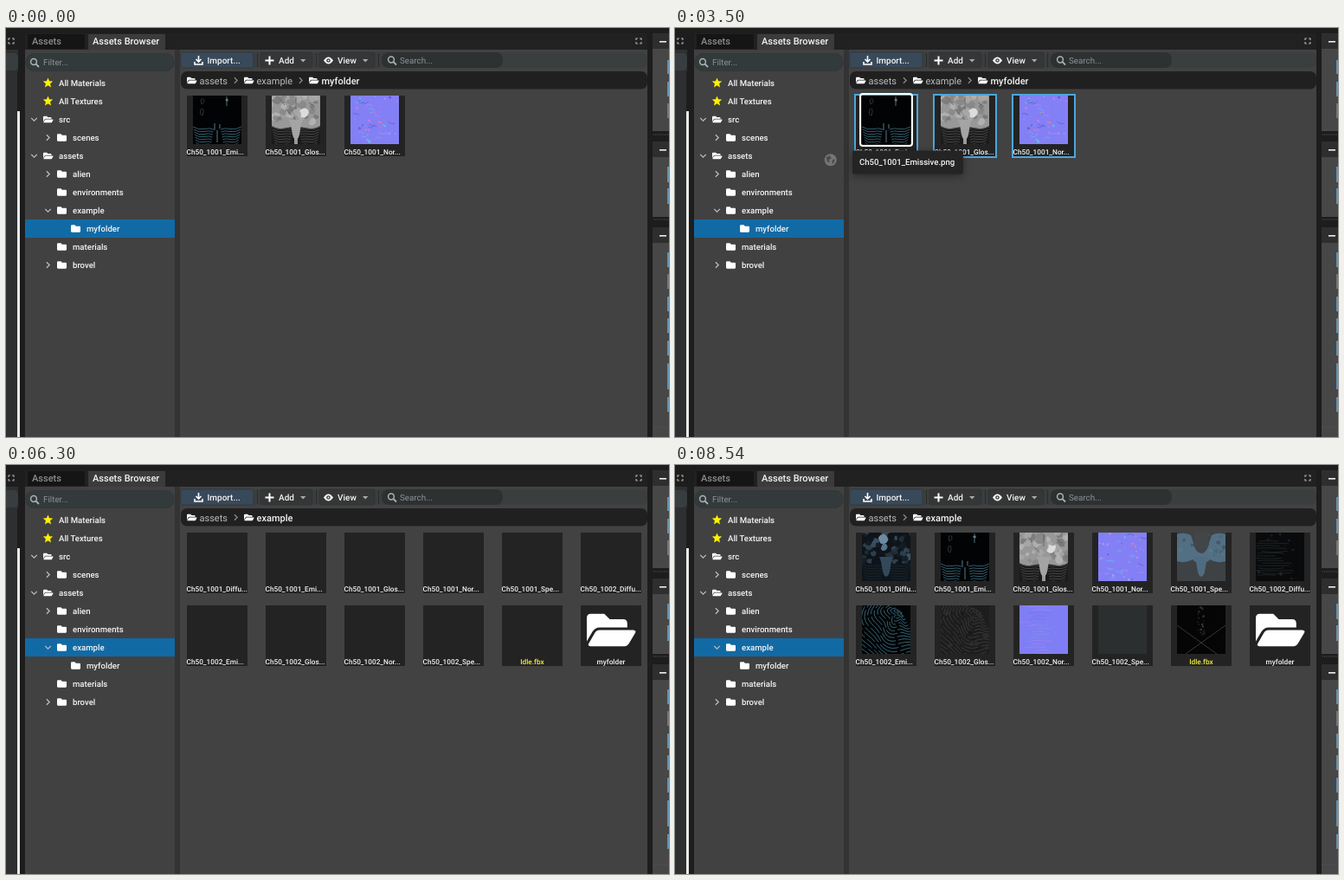
An HTML page for the animation above (9870 ms loop, 766 px wide and 472 px high).

```html
<!DOCTYPE html>
<html lang="en">
<head>
<meta charset="utf-8">
<title>Assets Browser</title>
<style>
html, body { margin: 0; width: 100%; height: 100%; overflow: hidden; background: #1d1d1d; }
#stage { display: block; width: 766px; height: 472px; }
text { font: 500 9.6px Roboto, Arial, sans-serif; fill: #f4f4f4; text-rendering: geometricPrecision; white-space: pre; }
.tab { font-size: 11px; }
.crumb { font-size: 11px; }
.path { font-size: 11px; font-weight: 400; fill: #b9bcbe; }
.btn { font-size: 10px; }
.label { font-size: 8.25px; }
.dim { fill: #8d9294; font-weight: 400; font-size: 9.8px; }
.soft { filter: blur(.4px); }
.edge { stroke: #303233; stroke-width: .6; }
.pick { fill: none; stroke: #4ba6dc; stroke-width: 2; }
.focus { fill: none; stroke: #fff; stroke-width: 2; }
.tip rect { fill: #242424; filter: drop-shadow(0 2px 4px rgba(0, 0, 0, .4)); }
</style>
</head>
<body>
<svg id="stage" viewBox="0 0 766 472"></svg>
<script>
const LOOP = 9870;
const stage = document.getElementById('stage');

let seed = 7;
function rand() {
  seed = (seed * 16807) % 2147483647;
  return seed / 2147483647;
}
const between = (a, b) => a + (b - a) * rand();
const pick = list => list[Math.floor(rand() * list.length)];
const repeat = (n, fn) => Array.from({ length: n }, (_, i) => fn(i)).join('');

// Basic pieces
const rect = (x, y, w, h, fill, r = 0) =>
  `<rect x="${x}" y="${y}" width="${w}" height="${h}" rx="${r}" fill="${fill}"/>`;
const text = (x, y, s, cls = '', extra = '') =>
  `<text x="${x}" y="${y}" class="${cls}" ${extra}>${s}</text>`;
const line = (d, stroke, width = 1) =>
  `<path d="${d}" fill="none" stroke="${stroke}" stroke-width="${width}"/>`;
const group = (cls, body) => `<g class="${cls}">${body}</g>`;
const at = (x, y, body, scale = 1) =>
  `<g transform="translate(${x} ${y}) scale(${scale})">${body}</g>`;
const timed = (on, body, fade = 0) => `<g data-on="${on}" data-fade="${fade}">${body}</g>`;

// Icons
const closedPath = '<path fill="#fff" d="M46 13H27l-6-7H5Q0 6 0 11v29q0 5 5 5h41q5 0 5-5V18q0-5-5-5z"/>';
const openPath = '<path fill="#fff" d="M57.300 29.200 50 41.600Q48.200 44.800 44.500 44.800h-40q-4-.500-2-3.600L9.700 28.800q1.800-3.200 5.500-3.200h40q4 .500 2.100 3.600zM15.200 22.400H48v-4.800q0-4.800-4.800-4.800h-16l-6.400-6.400h-16Q0 6.400 0 11.200V39L6.900 27.200q2.900-4.800 8.300-4.800z"/>';
// folders are placed by their left edge and vertical centre
const folder = (x, y, path, scale) => at(x, y - 25.6 * scale, path, scale);
const closedFolder = (x, y) => folder(x, y, closedPath, .216);
const openFolder = (x, y) => folder(x, y, openPath, .2);
const chevDown = (x, y, c = '#bbb') => at(x, y, line('M-3.3-1.6 0 1.7 3.3-1.6', c, 1.3));
const chevRight = (x, y, c = '#bbb') => at(x, y, line('M-1.6-3.3 1.7 0-1.6 3.3', c, 1.3));
const lens = (x, y) => at(x, y, '<circle cx="-1" cy="-1" r="3.4" fill="none" stroke="#aeb2b3" stroke-width="1.5"/>' + line('M1.6 1.6 5 5', '#aeb2b3', 1.8));
const expand = (x, y) => at(x, y, line('M-3-1V-3H-1M1-3H3V-1M3 1V3H1M-1 3H-3V1', '#aaa', 1.2));
function star(x, y) {
  const points = Array.from({ length: 10 }, (_, i) => {
    const r = i % 2 ? 2.7 : 6, a = Math.PI * (i / 5 - .5);
    return `${(x + r * Math.cos(a)).toFixed(1)},${(y + r * Math.sin(a)).toFixed(1)}`;
  });
  return `<polygon points="${points.join(' ')}" fill="#fff000"/>`;
}

// Texture thumbnails, 56 by 56
function blob(x, y, r, fill, opacity = 1) {
  const points = Array.from({ length: 9 }, (_, i) => {
    const a = i / 9 * Math.PI * 2, d = r * between(.55, 1.2);
    return `${(x + d * Math.cos(a)).toFixed(1)},${(y + d * Math.sin(a)).toFixed(1)}`;
  });
  return `<polygon points="${points.join(' ')}" fill="${fill}" opacity="${opacity}"/>`;
}
const mirror = body => body + `<g transform="translate(56 0) scale(-1 1)">${body}</g>`;
const ribs = (stroke, width) => mirror(repeat(7, i => {
  const y = 36 + i * 3;
  return line(`M${i * .6} ${y}Q7 ${y + 4} 13 ${y + 2.5}T${24 - i * .5} ${y + 3}`, stroke, width);
}));
// bent contour lines, upright on the left and level at the bottom right
function contours(n, stroke, width) {
  return repeat(n, k => {
    let d = '';
    for (let i = 0; i <= 22; i++) {
      const a = 1.1 + i * .12;
      const r = 3 + k * 72 / n + 2.5 * Math.sin(a * 6 + k * .25);
      d += (i ? 'L' : 'M') + (46 + r * Math.cos(a)).toFixed(1) + ' ' + (8 + r * Math.sin(a)).toFixed(1);
    }
    return `<path d="${d}" fill="none" stroke="${stroke}" stroke-width="${width}" stroke-dasharray="${between(12, 26).toFixed(0)} 3"/>`;
  });
}
const specks = (n, colors, size) => repeat(n, () =>
  blob(between(1, 55), between(1, 55), between(.5, size), pick(colors), .8));
const stem = fill => `<path d="M20 28h16q-2 4-3 11-1 11-5 12-4-1-5-12-1-7-3-11z" fill="${fill}"/>`;

const art = {
  emissive() {
    return rect(0, 0, 56, 56, '#020304') + ribs('#3f7185', .8) +
      line('M9 5q3-3 4 0t-3 5zM9 16q3-2 3 1t-1 6q-4-1-2-7', '#3c494e', .7) +
      blob(39, 5, 2, '#6d8a93') + line('M39 1v11', '#52707a', 1) +
      line('M25 32v8M28 40v14M31 33v5', '#3e5964', 1.4);
  },
  gloss() {
    return rect(0, 0, 56, 56, '#989898') +
      repeat(40, () => blob(between(0, 56), between(0, 34), between(2, 6), pick(['#858585', '#aaa', '#b8b8b8', '#777']), .8)) +
      mirror('<path d="M0 35q6 4 12 3t14-2v20H0z" fill="#1b1b1b"/>') +
      ribs('#555', .7) + stem('#a4a4a4') +
      blob(37, 19, 6, '#dcdcdc') + blob(23, 8, 6, '#898989') +
      line('M28 2v14M17 16l6 7M10 5l5 6M43 8l6 4', '#5f5f5f', .8);
  },
  normal() {
    return rect(0, 0, 56, 56, '#8380f6') +
      repeat(14, () => line(`M${between(0, 50)} ${between(2, 54)}q4 ${between(-4, 4)} ${between(5, 10)} ${between(-3, 3)}`, pick(['#6964d5', '#a38bf6', '#6cafe9']), 1)) +
      specks(34, ['#e27bd6', '#5fd6df', '#5a50bd', '#86dca9', '#c689f5', '#e77d9d'], 1.6);
  },
  diffuse() {
    return rect(0, 0, 56, 56, '#0e1419') +
      repeat(46, () => blob(between(0, 56), between(0, 36), between(2, 5), pick(['#304453', '#22303a', '#3c5364', '#141c23']), .9)) +
      blob(24, 8, 7, '#6d8ba0') + blob(26, 17, 4, '#577388') + ribs('#1e2a32', .8) + stem('#33495a');
  },
  specular() {
    return rect(0, 0, 56, 56, '#3f4244') +
      mirror('<path d="M0 2q8-3 16 1l4 12q1 7 8 9v10q-7 1-10-3-8 5-18 2z" fill="#526f84"/>') +
      repeat(22, () => blob(between(0, 56), between(2, 32), between(1, 3), pick(['#5b788d', '#486375', '#44525c']), .8)) +
      '<path d="M20 0h16l1 14-6 9h-6l-6-9z" fill="#434648"/>' + stem('#506c80');
  },
  darkDiffuse() {
    return rect(0, 0, 56, 56, '#090a0b') + repeat(15, i =>
      line(`M${between(0, 8)} ${10 + i * 2.8}q12 ${between(-2, 3)} ${between(18, 44)} 0`, '#202426', .9)) +
      specks(14, ['#241e1d', '#1a262c', '#2a2725'], 2.5);
  },
  stripes() { return rect(0, 0, 56, 56, '#030506') + contours(19, '#437a8f', .8); },
  greyStripes() {
    return rect(0, 0, 56, 56, '#1d1d1d') + contours(19, '#414141', .8) + specks(14, ['#151515', '#303030'], 4);
  },
  softNormal() {
    return rect(0, 0, 56, 56, '#807ef4') + repeat(16, i =>
      line(`M${between(0, 25)} ${i * 3.6 + 2}q10 -2 ${between(12, 28)} 0`, pick(['#8f88f6', '#7a90f0', '#9683f4', '#7a77ec']), 1)) +
      specks(10, ['#7ba1ef', '#a783ed'], 1.2);
  },
  flat() {
    return rect(0, 0, 56, 56, '#2b2f30') + specks(4, ['#343a3c'], .8);
  },
  model() {
    return rect(0, 0, 56, 56, '#050505') + line('M0 23 46 56M56 23 10 56', '#454545', .8) +
      repeat(26, () => blob(28 + between(-4, 4), between(2, 34), between(.6, 1.8), pick(['#282828', '#3a3a3a', '#1c1c1c'])));
  }
};
const thumb = (x, y, name) => group('soft', `<svg x="${x}" y="${y}" width="56" height="56">${art[name]()}</svg>`);

const tileX = c => 209 + 91 * c;
const tileBox = (x, y, name) => rect(x, y, 70, 70, '#232323') +
  (/\.\.\.$/.test(name) ? text(x - .5, y + 68, name, 'label')
    : text(x + 35, y + 68, name, 'label', `text-anchor="middle"${name === 'Idle.fbx' ? ' style="fill:#f5f03c"' : ''}`));

// Window chrome
function chrome() {
  const bars = [
    [0, 25, 14, 25, '#303030'], [0, 50, 13, 422, '#2d2f30'], [13, 96, 3, 376, '#e9e9e9'],
    [22, 6, 719, 19, '#212121'], [22, 25, 173, 447, '#414141'],
    [195, 25, 6, 447, '#333'], [201, 25, 540, 447, '#424242']
  ];
  return rect(0, 0, 766, 472, '#1d1d1d') + bars.map(b => rect(...b)).join('') +
    rect(-8, 29, 22, 20, '#383d3f', 5) + expand(6, 15) + expand(731, 15) +
    rect(25, 7, 66, 17, '#151515', 1) + text(30, 19, 'Assets', 'tab', 'style="fill:#8d8d8d"') +
    rect(95, 7, 89, 18, '#3b3b3b', 1) + text(100, 19, 'Assets Browser', 'tab') +
    group('edge', rect(23, 29.5, 171, 20, '#333a3c', 9)) + lens(33, 40) + text(43, 43, 'Filter...', 'dim');
}

function sidePanels() {
  const panels = [[6, 113], [131, 87], [230, 242]];
  const fields = [[37, 16, 1], [62, 17, 1], [87, 17], [160, 18, 1], [185, 18, 1], [259, 17, 1], [284, 17],
    [310, 17, 1], [335, 17, 1], [361, 17, 1], [387, 30, 1], [426, 17, 1]];
  return panels.map(([y, h]) => rect(747, y, 19, h, '#474747') + rect(747, y, 19, 18, '#2e2e2e') +
    rect(755, y + 9, 8, 1.6, '#eee')).join('') +
    [123, 221, 461].map(y => `<path d="M748 ${y}h18" stroke="#555" stroke-dasharray="1 1"/>`).join('') +
    fields.map(([y, h, blue]) => rect(764, y, 2, h, blue ? '#6493b0' : '#777')).join('');
}

function toolbar() {
  const caret = x => `<path d="M${x} 36h6.4l-3.2 3.6z" fill="#aaa"/>`;
  return rect(202, 28, 539, 18, '#3b3e3f', 6) +
    group('edge', rect(202, 28, 84, 18, '#38495a', 2) + rect(294, 28, 60, 18, '#343637', 2) + rect(362, 28, 64, 18, '#343637', 2)) +
    [290, 358, 430].map(x => rect(x, 29, 1, 16, '#2a2a2a')).join('') +
    rect(434, 28, 140, 18, '#2d3132', 8) +
    line('M222.500 32v6.500M219.500 36l3 3 3-3M218 39v3h9v-3', '#fff', 1.6) + text(232.5, 40.5, 'Import...', 'btn') +
    line('M304.500 32.500v10M299.500 37.500h10', '#fff', 2) + text(315, 40.5, 'Add', 'btn') + caret(340) +
    '<path d="M367 37.500q5.500-8 11 0-5.500 8-11 0z" fill="#fff"/><circle cx="372.500" cy="37.500" r="2.300" fill="#343637"/><circle cx="372.500" cy="37.500" r="1" fill="#fff"/>' +
    text(383, 40.5, 'View', 'btn') + caret(412) +
    lens(446, 37.5) + text(455, 41, 'Search...', 'dim') + rect(202, 50, 539, 20.5, '#202020', 7);
}

function crumbs() {
  const item = (x, name, cls = 'path') => openFolder(x, 60.5) + text(x + 14.5, 64.5, name, cls);
  return item(209, 'assets') + chevRight(265.5, 60.5, '#8a8a8a') +
    timed('0-6230', item(275, 'example') + chevRight(340.5, 60.5, '#8a8a8a') + item(350, 'myfolder', 'crumb')) +
    timed('6230-9870', item(275, 'example', 'crumb'));
}

function tree() {
  const rows = [
    ['All Materials', 1], ['All Textures', 1], ['src', 1, 'open'], ['scenes', 2, 'shut'],
    ['assets', 1, 'open'], ['alien', 2, 'shut'], ['environments', 2], ['example', 2, 'open'],
    ['myfolder', 3], ['materials', 2], ['brovel', 2, 'shut']
  ];
  const bar = y => group('soft', rect(22, y, 173, 21, '#126aa5'));
  return timed('0-6230', bar(221)) + timed('6230-9870', bar(200)) +
    rows.map(([name, level, fold], i) => {
      const x = 45 + level * 16, y = 63.5 + 21 * i;
      const icon = i < 2 ? star(48.5, y) : (level === 1 ? openFolder : closedFolder)(x - 18, y);
      const arrow = fold === 'open' ? chevDown(x - 28.5, y) : fold ? chevRight(x - 28.5, y) : '';
      return icon + arrow + text(x, y + 3.5, name);
    }).join('');
}

function pickedView() {
  const names = ['Emi', 'Glos', 'Nor'], arts = ['emissive', 'gloss', 'normal'];
  const picked = ['1050-5460', '1680-1750,2520-5460', '1820-5460'];
  const border = (c, on) => timed(on, `<rect class="pick" x="${tileX(c) - 1}" y="77" width="72" height="72"/>`);
  const focus = (c, on) => timed(on, `<rect class="focus" x="${tileX(c) + 5}" y="76" width="60" height="60" rx="3"/>`);
  const tip = (x, w, name, on) => timed(on, group('tip', `<rect x="${x}" y="141.5" width="${w}" height="27" rx="2"/>` + text(x + 8, 157.5, name)), 110);
  return timed('0-5460', names.map((n, c) =>
    tileBox(tileX(c), 78, `Ch50_1001_${n}...`) + thumb(tileX(c) + 7, 78, arts[c]) + border(c, picked[c])).join('')) +
    focus(0, '1400-2380,3360-5460') + focus(2, '2380-3360') +
    tip(205, 128, 'Ch50_1001_Emissive.png', '1150-1680,3130-3640') +
    tip(365.5, 121, 'Ch50_1001_Normal.png', '1960-2800');
}

function folderView() {
  // label, texture, time it is loaded, colour of its first row
  const items = [
    ['Ch50_1001_Diffu...', 'diffuse', 7070], ['Ch50_1001_Emi...', 'emissive', 6440],
    ['Ch50_1001_Glos...', 'gloss', 6860], ['Ch50_1001_Nor...', 'normal', 7560, '#5632b4'],
    ['Ch50_1001_Spe...', 'specular', 6720], ['Ch50_1002_Diffu...', 'darkDiffuse', 7280, '#080808'],
    ['Ch50_1002_Emi...', 'stripes', 6510], ['Ch50_1002_Glos...', 'greyStripes', 6580],
    ['Ch50_1002_Nor...', 'softNormal', 7770, '#5632b4'], ['Ch50_1002_Spe...', 'flat', 6580],
    ['Idle.fbx', 'model', 6860], ['myfolder']
  ];
  return timed('6230-9870', items.map(([name, skin, loaded, edge], i) => {
    const x = tileX(i % 6), y = i < 6 ? 78 : 162;
    if (!skin) return tileBox(x, y, name) + folder(x + 7, y + 28.5, openPath, .975);
    return tileBox(x, y, name) + (edge ? timed(`6580-${loaded}`, rect(x + 7, y, 56, 1.5, edge)) : '') +
      timed(`${loaded}-9870`, thumb(x + 7, y, skin));
  }).join(''));
}

const ghost = '<g id="ghost"><circle r="7" fill="#757575"/><path d="M-5-3-1-5 1-2-2 0-1 3-4 2zM2 0 5-1 4 3 2 5z" fill="#4b4b4b"/></g>';

stage.innerHTML = chrome() + sidePanels() + toolbar() + crumbs() + tree() + folderView() + pickedView() + ghost;

const parts = [...stage.querySelectorAll('[data-on]')].map(el => ({
  el,
  fade: +el.dataset.fade,
  spans: el.dataset.on.split(',').map(s => s.split('-').map(Number))
}));
const ghostEl = document.getElementById('ghost');

function dragGhost(t) {
  const on = t >= 3430 && t < 4270;
  ghostEl.setAttribute('visibility', on ? 'visible' : 'hidden');
  if (!on) return;
  // quick exit from the tile, then a slowing glide down to the folder row
  const first = Math.min(1, (t - 3430) / 70);
  const k = Math.max(0, Math.min(1, (t - 3500) / 630)), ease = 1 - (1 - k) ** 2;
  const x = 205 - 25 * first - 88 * ease, y = 138 + 14 * first + 61 * ease;
  ghostEl.setAttribute('transform', `translate(${x} ${y})`);
}

function render(now) {
  const t = now % LOOP;
  for (const { el, fade, spans } of parts) {
    const span = spans.find(([a, b]) => t >= a && t < b);
    el.style.display = span ? '' : 'none';
    if (span && fade) el.style.opacity = Math.min(1, (t - span[0]) / fade);
  }
  dragGhost(t);
}

const start = performance.now();
function tick() {
  render(performance.now() - start);
  requestAnimationFrame(tick);
}
tick();
</script>
</body>
</html>
```
